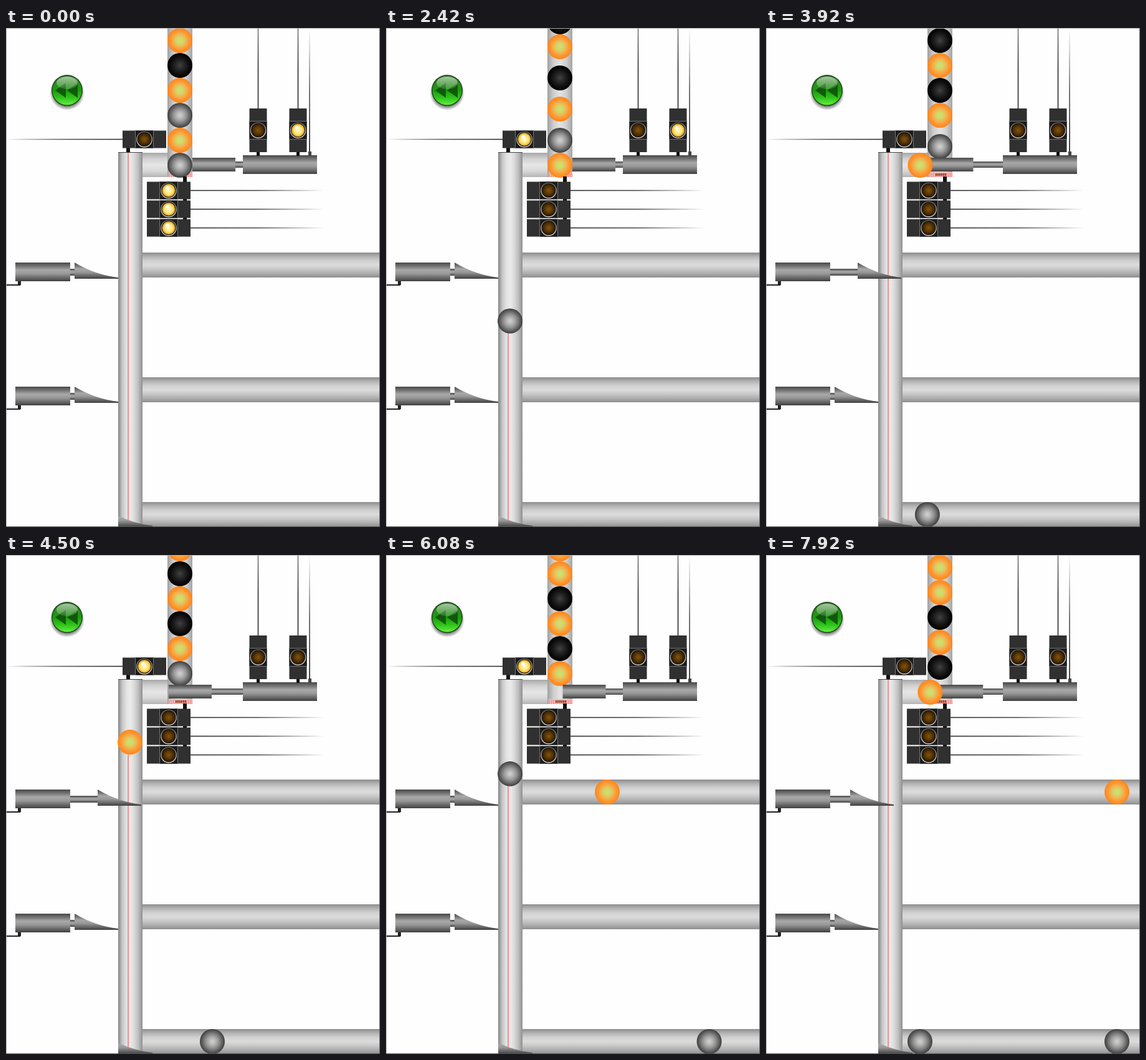
An HTML page with a canvas for the animation above (8000 ms loop, 600x800 px).

```html
<!DOCTYPE html>
<html lang="en">
<head>
<meta charset="utf-8">
<title>Ball sorter</title>
<style>
html, body { margin: 0; width: 100%; height: 100%; overflow: hidden; background: #fefefe; }
canvas { display: block; }
</style>
</head>
<body>
<canvas id="stage" width="600" height="800"></canvas>
<script>
const ctx = document.getElementById('stage').getContext('2d');
const LOOP = 8000, FPS = 12, STEP = 1000 / 30;
const PUSH_SPEED = 0.15, FALL_SPEED = 0.3055, STROKE = 80;

const queue = [...'SOSOBOBOO'];
const lampsFor = { S: 3, O: 2, B: 1 };
const ballColors = {
  S: ['#d2d2d2', '#b8b8b8', '#969696', '#6a6a6a', '#3e3e3e'],
  O: ['#c6e376', '#d3d868', '#edb653', '#ff9630', '#ff861c'],
  B: ['#424242', '#2e2e2e', '#1c1c1c', '#0c0c0c', '#000']
};

// push: piston starts, fall: ball drops into the shaft, sag: queue settles on
// the piston, release: queue drops into place, lane: [time, x] along the exit pipe
const cycles = [
  { push: 1000, fall: 1599, sag: 1180, release: 2270, y: 780,
    lane: [[3432, 199], [4500, 331], [5333, 427], [6448, 563]] },
  { push: 3680, fall: 4238, sag: 3860, release: 4900, y: 380,
    lane: [[4762, 199], [5333, 263], [6833, 447], [7761, 563]] },
  { push: 5113, fall: 5655, sag: 5290, release: 6340, y: 780,
    lane: [[7488, 199], [7917, 247]] },
  { push: 7785, fall: 8345, sag: 7962, release: 9000, y: 380, lane: [[8900, 199]] }
];

const clamp = (v, lo, hi) => Math.max(lo, Math.min(hi, v));

function track(keys, t) {
  if (t <= keys[0][0]) return keys[0][1];
  for (let i = 1; i < keys.length; i++) {
    const [t0, v0] = keys[i - 1], [t1, v1] = keys[i];
    if (t < t1) return v0 + (v1 - v0) * (t - t0) / (t1 - t0);
  }
  return keys[keys.length - 1][1];
}

function shade(g, colors) {
  colors.forEach((c, i) => g.addColorStop(i / (colors.length - 1), c));
  return g;
}
const linear = (x0, y0, x1, y1, colors) => shade(ctx.createLinearGradient(x0, y0, x1, y1), colors);
const radial = (x, y, r, colors) => shade(ctx.createRadialGradient(x, y, 0, x, y, r), colors);

function rect(x, y, w, h, fill) {
  ctx.fillStyle = fill;
  ctx.fillRect(x, y, w, h);
}
function disc(x, y, r, fill) {
  ctx.fillStyle = fill;
  ctx.beginPath();
  ctx.arc(x, y, r, 0, 7);
  ctx.fill();
}
function poly(fill, ...points) {
  ctx.fillStyle = fill;
  ctx.beginPath();
  points.forEach(p => ctx.lineTo(...p));
  ctx.fill();
}

const PIPE = ['#8c8c8c', '#b4b4b4', '#d0d0d0', '#dcdcdc', '#c8c8c8', '#aeaeae', '#8e8e8e'];
const SHAFT = ['#858585', '#c6c6c6', '#e2e2e2', '#ebebeb', '#d9d9d9', '#bcbcbc', '#909090'];
const STEEL = ['#484848', '#747474', '#a8a8a8', '#989898', '#6c6c6c', '#404040'];

const hBar = (x, y, w, h, colors) => rect(x, y, w, h, linear(0, y, 0, y + h, colors));
const vBar = (x, y, w, h, colors) => rect(x, y, w, h, linear(x, 0, x + w, 0, colors));

function ball(kind, x, y) {
  disc(x, y, 20, radial(x, y, 20, ballColors[kind]));
}

function lamp(x, y, on) {
  disc(x, y, 14, '#141414');
  disc(x, y, 13, linear(x, y - 13, x, y + 13, ['#5c5c5c', '#a0a0a0', '#d8d8d8']));
  disc(x, y, 11.5, '#20160a');
  disc(x, y, 10.5, radial(x, y, 10.5, on
    ? ['#fffbe0', '#fff0a0', '#ffe06a', '#d49a20']
    : ['#7e5510', '#6b430a', '#4f3006', '#2e1b03']));
  if (on) disc(x - 2, y - 4, 3, '#fffdf0');
}

// Housing is 70 long and 28 wide, centred on the lamp
function sensor(x, y, on, upright) {
  ctx.save();
  ctx.translate(x, y);
  if (upright) ctx.rotate(Math.PI / 2);
  rect(-35, -14, 70, 28, '#303030');
  rect(-15, -14, 30, 28, '#1b1b1b');
  rect(-15, -14, 1, 28, '#777');
  rect(14, -14, 1, 28, '#777');
  ctx.restore();
  lamp(x, y, on);
}

function button(x, y) {
  disc(x, y + 4, 28, radial(x, y + 4, 28, ['#333', '#333', '#555', '#777', '#7770']));
  disc(x, y, 25, '#1d4a18');
  disc(x, y, 23.5, linear(0, y - 24, 0, y + 24, ['#3c7a34', '#2a8a1e', '#1c9a10', '#2fc41a', '#66f044']));
  for (const dx of [-19, 0]) poly('#0c4a08d0', [x + dx, y], [x + dx + 17, y - 12], [x + dx + 17, y + 12]);
  ctx.fillStyle = linear(0, y - 23, 0, y, ['#ffffff90', '#ffffff18']);
  ctx.beginPath();
  ctx.ellipse(x, y - 12, 17, 10, 0, 0, 7);
  ctx.fill();
}

function wedge(x, y) {
  ctx.fillStyle = linear(0, y, 0, y + 26, STEEL);
  ctx.beginPath();
  ctx.moveTo(x, y);
  ctx.quadraticCurveTo(x + 34, y + 20, x + 70, y + 24);
  ctx.lineTo(x + 70, y + 26);
  ctx.lineTo(x, y + 26);
  ctx.fill();
}

function flipper(y, reach) {
  const x = 110 + reach;
  rect(0, y + 35, 23, 2, '#222');
  rect(19, y + 30, 5, 6, '#222');
  hBar(102, y + 10, x - 102, 11, STEEL);
  hBar(15, y, 88, 30, STEEL);
  wedge(x, y);
}

// The lowest wedge is fixed and only shows inside the shaft
function floorWedge() {
  ctx.save();
  ctx.beginPath();
  ctx.rect(180, 774, 60, 26);
  ctx.clip();
  wedge(165, 774);
  ctx.restore();
}

function pipes() {
  rect(0, 0, 600, 800, '#fefefe');
  for (const y of [360, 560, 760]) hBar(219, y, 381, 40, PIPE);
  hBar(219, 200, 42, 39, ['#a8a8a8', '#d2d2d2', '#e6e6e6', '#d8d8d8', '#b4b4b4']);
  vBar(259, 0, 40, 239, ['#a0a0a0', '#cfcfcf', '#e4e4e4', '#d0d0d0', '#a4a4a4']);
  vBar(180, 199, 39, 599, SHAFT);
  rect(180, 199, 39, 1, '#444');
  rect(261, 231, 38, 8, '#f6b5b0');
  for (let x = 262; x < 299; x += 3) rect(x, 233, 1, 6, '#e88');
  for (let x = 272; x < 288; x += 3) rect(x, 233, 2, 4, '#8a5030');
}

function wires() {
  const dark = '#222', clear = '#2220';
  rect(0, 177.75, 187, 1.5, linear(0, 0, 187, 0, [clear, '#555', dark]));
  for (const y of [260.5, 290.5, 320.5]) {
    rect(296, y - 0.75, 214, 1.5, linear(296, 0, 510, 0, [dark, '#444', clear]));
  }
  for (const x of [404.5, 468.5]) {
    rect(x - 0.75, 0, 1.5, 130, linear(0, 0, 0, 130, ['#777', dark, dark]));
    rect(x - 2.5, 198, 5, 7, '#111');
  }
  rect(486, 0, 2, 200, linear(0, 0, 0, 200, ['#8880', '#777', '#444']));
  rect(485, 198, 5, 7, '#444');
  rect(193, 191, 6, 8, '#111');
  rect(284, 238, 6, 80, '#111');
}

function pistonReach(t) {
  return Math.max(...cycles.map(c => t < c.push ? 0 : t < c.push + 540
    ? Math.min(STROKE, (t - c.push) * PUSH_SPEED)
    : Math.max(0, STROKE - (t - c.push - 540) * PUSH_SPEED)));
}

function flipperReach(t) {
  const move = start => clamp((t - start) * PUSH_SPEED, 0, 37);
  return move(3650) - move(5126) + move(7750);
}

// The queue moves in 10 px hops, each ball one step after the one below
function queueY(i, t) {
  let y = 220 - 40 * i;
  cycles.forEach((c, n) => {
    if (i <= n) return;
    const hops = (start, max) => clamp(Math.floor((t - start) / STEP) - (i - n - 1), 0, max);
    y += 10 * (hops(c.sag, 1) + hops(c.release, 3));
  });
  return y;
}

function sortedPos(c, t) {
  if (t < c.fall) return [track([[c.push + 27, 279], [c.fall, 199]], t), 220];
  return [track(c.lane, t), Math.min(c.y, 220 + (t - c.fall) * FALL_SPEED)];
}

function draw(t) {
  const reach = pistonReach(t);
  const started = cycles.filter(c => t >= c.push).length;
  const sorted = cycles.slice(0, started).map(c => sortedPos(c, t));
  const blocking = sorted.find(([x]) => x <= 216);
  const headSeen = started === 0 || t >= cycles[started - 1].release + 170;
  const lit = headSeen ? lampsFor[queue[started]] : 0;

  pipes();
  const beamTop = blocking ? blocking[1] + 20 : 200;
  rect(195, beamTop, 2, Math.max(0, 790 - beamTop), '#f46a6ab0');

  for (let i = started; i < queue.length; i++) ball(queue[i], 279, queueY(i, t));
  hBar(366 - reach, 214, 16 + reach, 10, STEEL);
  hBar(299 - reach, 208, 69, 22, STEEL);
  hBar(380, 204, 119, 30, STEEL);
  sorted.forEach(([x, y], i) => ball(queue[i], x, y));

  flipper(376, flipperReach(t));
  flipper(575, 0);
  floorWedge();

  wires();
  sensor(222, 178.5, !!blocking);
  [260.5, 290.5, 320.5].forEach((y, i) => sensor(261, y, i < lit));
  sensor(404.5, 164, reach > 72, true);
  sensor(468.5, 164, reach === 0, true);
  button(98, 100);

  rect(0, 0, 600, 1, '#aaa');
  rect(0, 0, 1, 800, '#aaa');
  rect(599, 0, 1, 800, '#555');
  rect(0, 799, 600, 1, '#555');
}

function frame() {
  const t = performance.now() % LOOP;
  draw(Math.floor((t + 4) * FPS / 1000) % (LOOP * FPS / 1000) * 1000 / FPS);
  requestAnimationFrame(frame);
}
frame();
</script>
</body>
</html>
```
